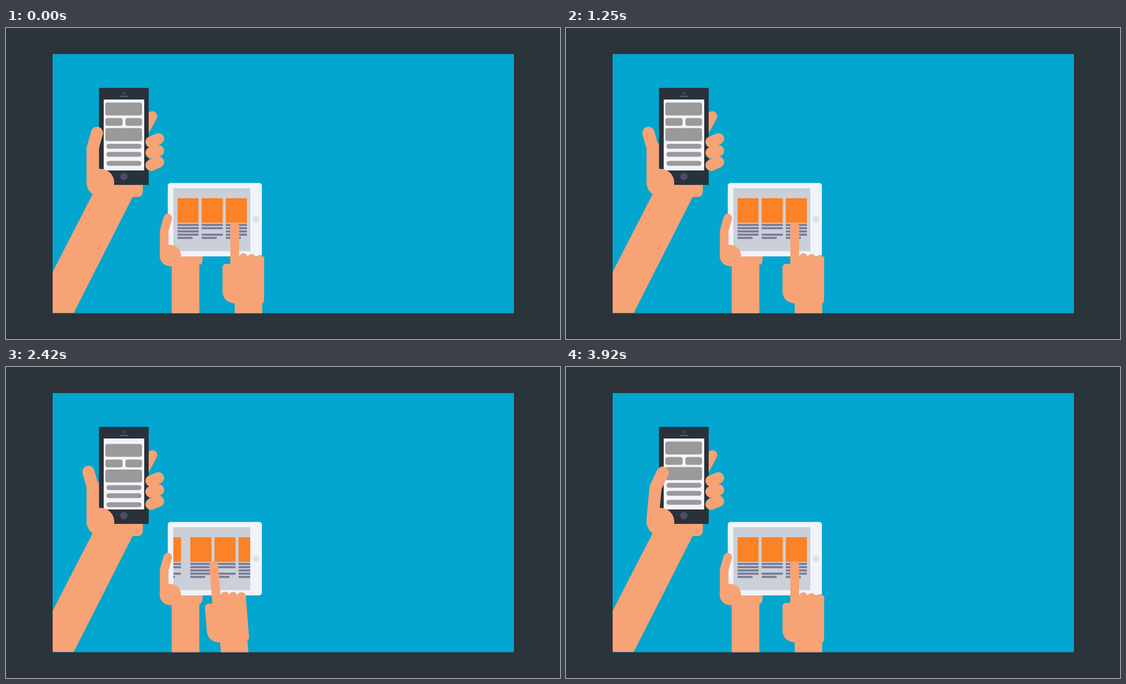
Recreate the animation shown at these times as an HTML page. Size 998 by 561 pixels, loop 4010 ms.

```html
<!DOCTYPE html>
<html lang="en">
<head>
<meta charset="utf-8">
<title>Swiping devices</title>
<style>
  html, body { margin: 0; width: 100%; height: 100%; overflow: hidden; background: #2b333b; }
  svg { display: block; width: 998px; height: 561px; }
  .skin { fill: #f7a376; }
  .limb { fill: none; stroke: #f7a376; stroke-linecap: round; stroke-linejoin: round; }
  .block { fill: #9a9a9a; }
  .photo { fill: #fb8226; }
  .line { fill: #7a7b98; }
</style>
</head>
<body>
<svg viewBox="0 0 998 561">
  <defs>
    <clipPath id="panel"><rect x="84" y="47" width="831" height="467.5"/></clipPath>
    <clipPath id="phoneClip"><rect x="176" y="129" width="73" height="128"/></clipPath>
    <clipPath id="tabletClip"><rect x="301.5" y="289" width="138.5" height="113.5"/></clipPath>
  </defs>
  <rect width="998" height="561" fill="#2b333b"/>
  <g clip-path="url(#panel)">
    <rect x="84" y="47" width="831" height="468" fill="#02a6ce"/>

    <!-- phone -->
    <path class="skin" d="M157 298 L84 440 L46 514 H122 L228 305 V290 Z"/>
    <path class="skin" d="M164 290 V213 Q164 208 168 207 H200 V260 H246.500 V295 Q246.500 305 236 305 H164 Z"/>
    <path class="limb" stroke-width="18" d="M263.500 159 L249 186"/>
    <rect x="167.500" y="108" width="89.500" height="175" fill="#29313b"/>
    <circle cx="212.300" cy="117.500" r="2.100" fill="#4b5266"/>
    <rect x="205" y="122" width="14.500" height="3" rx="1.500" fill="#4b5266"/>
    <circle cx="212.300" cy="268.200" r="6.500" fill="#484f66"/>
    <rect x="176" y="129" width="73" height="128" fill="#f4f3fb"/>
    <g clip-path="url(#phoneClip)"><g id="feedA"/><g id="feedB"/></g>
    <path class="limb" stroke-width="20.600" d="M274.500 200 L261.500 205.500 M274.500 221.500 L261.500 225 M274.500 242 L261.500 247.500"/>
    <path class="limb" stroke-width="21.800" id="thumb"/>
    <circle class="skin" cx="170" cy="279" r="25"/>

    <!-- tablet -->
    <path class="skin" d="M298.500 405 H354 V419 Q354 428 345 428 H348.300 V520 H298.500 Z"/>
    <rect x="291.500" y="279.500" width="169.500" height="132.500" rx="5" fill="#f1f3fa"/>
    <rect x="301.500" y="289" width="138.500" height="113.500" fill="#cbd0d8"/>
    <circle cx="450.500" cy="345.500" r="5.200" fill="#e4e5ea" stroke="#d0d2d8"/>
    <rect x="448.500" y="343.500" width="4" height="4" rx="1" fill="none" stroke="#d0d2d8" stroke-width=".8"/>
    <g clip-path="url(#tabletClip)"><g id="gridA"/><g id="gridB"/></g>
    <path class="limb" stroke-width="15.600" d="M285 408 V366 L291.500 343"/>
    <circle class="skin" cx="296" cy="410.500" r="19.300"/>
    <g id="hand" class="skin">
      <path d="M404 425.500 V358 A8 8 0 0 1 420 358 V415
               A7.600 7.600 0 0 1 435.300 413 A7.600 7.600 0 0 1 450 415
               A7.600 7.600 0 0 1 465 420 V489 Q465 495.500 461.500 497.500
               V580 H412 V497 Q390 494 390 474 V433 Q390 425.500 397 425.500 Z"/>
    </g>
  </g>
</svg>
<script>
const $ = id => document.getElementById(id);

function rect(parent, cls, x, y, w, h, rx = 0) {
  const el = document.createElementNS('http://www.w3.org/2000/svg', 'rect');
  Object.entries({ class: cls, x, y, width: w, height: h, rx })
    .forEach(([name, value]) => el.setAttribute(name, value));
  parent.append(el);
}

function buildFeed(parent, cards, pair, bars) {
  cards.forEach(y => rect(parent, 'block', 179, y, 66, 23.4, 4));
  [[179, 31], [215, 30]].forEach(([x, w]) => rect(parent, 'block', x, pair, w, 14, 4));
  bars.forEach(y => rect(parent, 'block', 181, y, 63, 8.8, 4.4));
}

// shortCol tells which columns lack the third line (odd or even).
function buildGrid(parent, left, shortCol) {
  for (let c = 0; c < 3; c++) {
    const x = left + c * 43.5;
    rect(parent, 'photo', x, 307, 38, 44.5);
    for (let n = 0; n < 5; n++) {
      if (n === 2 && c % 2 === shortCol) continue;
      rect(parent, 'line', x, 353.4 + n * 5.85, n === 4 ? 27 : 38, 3.7);
    }
  }
}

buildFeed($('feedA'), [134.4, 180.6], 162.6, [209, 223.5, 239.7]);
buildFeed($('feedB'), [184.7, 231.2], 212, [140, 156, 170.6]);
buildGrid($('gridA'), 309, 1);
buildGrid($('gridB'), 308.2, 0);

const LOOP = 4010, STEP = 1000 / 12, CYCLE = 7.75, LEAD = 2;

// Rows: phase in steps within one swipe, then the values.
const FEED = [[0, -.033], [.25, -.024], [.8, -.006], [1.3, 0], [4.75, 0], [5.25, .22],
  [5.75, .5], [6.25, .73], [6.75, .86], [7.25, .93], [CYCLE, .967]];
const GRID = [[0, -.163], [.25, -.143], [.75, -.06], [1.3, 0], [4.75, 0], [5.25, .1],
  [6, .4], [6.75, .67], [7.25, .78], [CYCLE, .837]];
const SWING = [[0, 1], [.25, .51], [.6, .15], [1, 0], [4.75, 0], [5.5, .35],
  [6.25, .9], [7, 1.2], [7.4, 1.2], [CYCLE, 1]];
// Knuckle x, y and tip x, y.
const THUMB = [[0, 156, 216, 148.5, 189], [1.5, 156, 216, 148.5, 189],
  [2, 156, 217, 164, 189], [2.5, 161.5, 217, 174, 190.5],
  [2.75, 167.5, 217.5, 187.5, 198], [3.4, 176, 225, 203, 215],
  [4, 181, 232, 208.5, 232], [4.75, 181, 232, 208.5, 232],
  [5.5, 172, 221, 197, 207], [6.25, 160, 217, 171, 190],
  [6.9, 156, 216, 148.5, 189], [CYCLE, 156, 216, 148.5, 189]];

function sample(table, p) {
  const i = Math.max(1, table.findIndex(row => row[0] >= p));
  const a = table[i - 1], b = table[i], f = (p - a[0]) / (b[0] - a[0]);
  return a.slice(1).map((v, n) => v + (b[n + 1] - v) * f);
}

// Two pages follow each other endlessly; pitch[0] leads A to B, pitch[1] B to A.
function scroll(pages, pos, pitch, axis) {
  const n = Math.floor(pos), f = pos - n, odd = n & 1, d = pitch[odd];
  const place = (page, shift) =>
    page.setAttribute('transform', `translate(${axis === 'x' ? [shift, 0] : [0, shift]})`);
  place(pages[odd], -f * d);
  place(pages[1 - odd], (1 - f) * d);
}

const feeds = [$('feedA'), $('feedB')], grids = [$('gridA'), $('gridB')];

function draw(ms) {
  const time = Math.min(47, Math.floor((ms + 4) / STEP)) + LEAD;
  const swipe = Math.floor(time / CYCLE), p = time - swipe * CYCLE;
  scroll(feeds, swipe + sample(FEED, p)[0], [120.5, 131], 'y');
  scroll(grids, swipe + sample(GRID, p)[0], [139.5, 141], 'x');
  const [kx, ky, tx, ty] = sample(THUMB, p);
  $('thumb').setAttribute('d', `M156 274 L${kx} ${ky} L${tx} ${ty}`);
  const [m] = sample(SWING, p);
  $('hand').setAttribute('transform', `translate(${-25 * m} 0) rotate(${-4.7 * m} 412 514)`);
}

const start = performance.now();
function tick() {
  draw((performance.now() - start) % LOOP);
  requestAnimationFrame(tick);
}
tick();
</script>
</body>
</html>
```
